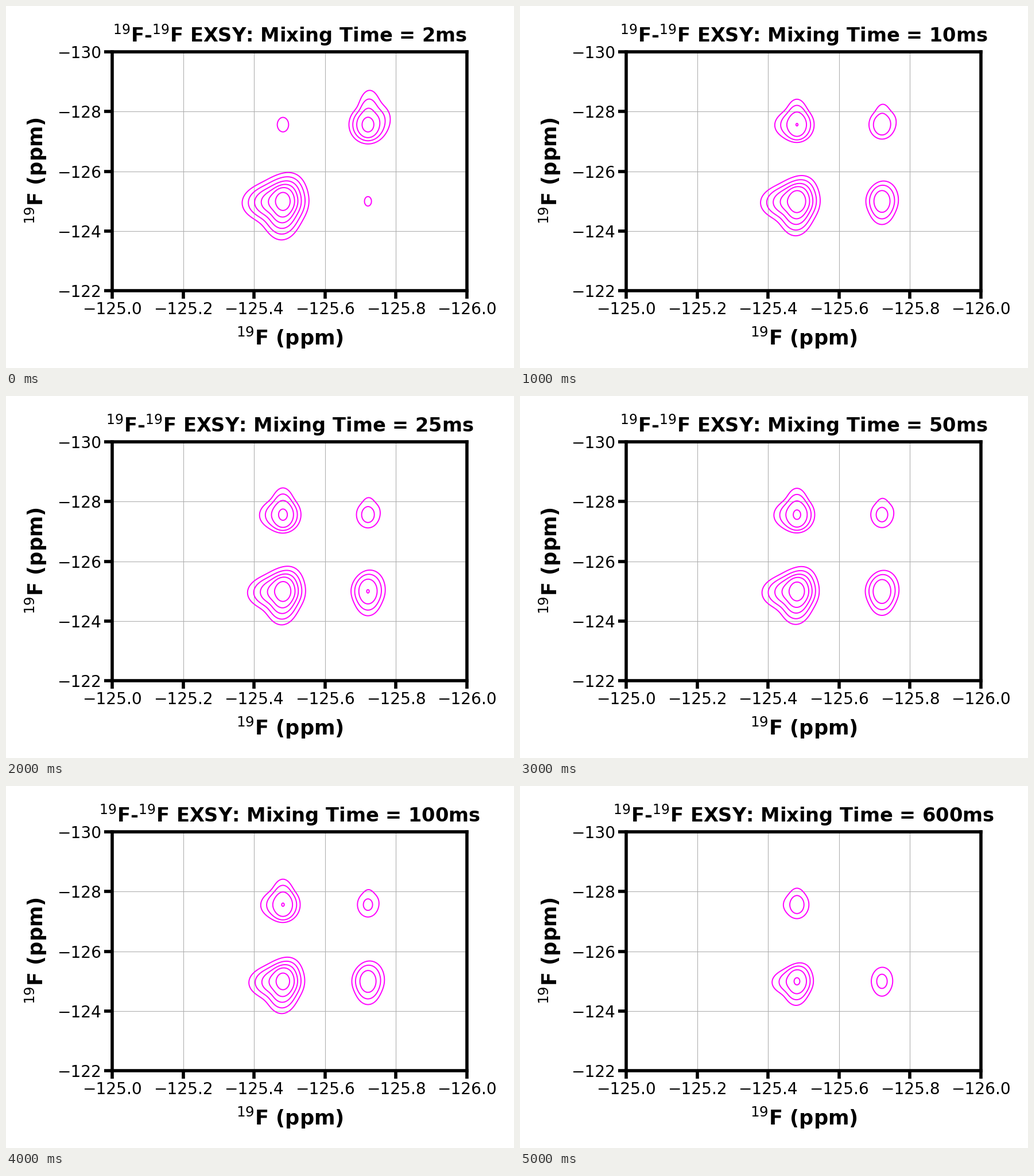
Recreate the animation shown at these times as a matplotlib script. Size 885 by 632 pixels, loop 5.5 s.

```python
import numpy as np
import matplotlib.pyplot as plt
from matplotlib.animation import FuncAnimation
from matplotlib.collections import LineCollection

W, H, DPI = 885, 632, 100
LEFT, RIGHT, TOP, BOTTOM = 185, 803, 80, 497
SCALE = 1.01

MIXING_MS = [2, 5, 10, 15, 25, 35, 50, 75, 100, 200, 600]

EXCHANGE = 0.25    # exchange rate per ms
DECAY = 0.0029     # relaxation, contour levels per ms
PER_E = 3.14       # contour levels per factor e in intensity

THETA = np.linspace(0, 2 * np.pi, 241)


class Peak:
    """A spectral peak whose contours grow from an ellipse to a cornered outline.

    height: contour levels after full exchange; excess: share still to exchange
    core: ellipse half axes; corners: (angle, size, sharpness) added to base
    """

    def __init__(self, x, y, height, excess, core, base, corners):
        self.x, self.y = x, y
        self.height, self.excess = height, excess
        rx, ry = core
        self.core = rx * ry / np.hypot(ry * np.cos(THETA), rx * np.sin(THETA))
        self.outline = base + sum(
            size * np.exp(sharp * (np.cos(THETA - np.radians(angle)) - 1))
            for angle, size, sharp in corners)

    def levels(self, ms):
        mixing = np.log(1 + self.excess * np.exp(-EXCHANGE * ms))
        return self.height + PER_E * mixing - DECAY * ms

    def contour(self, level):
        """Closed curve at a depth of some levels below the summit."""
        m = 1 - np.exp(-(level / 2) ** 2)
        size = np.sqrt(level) * (1 + 0.1 * level)
        r = size * ((1 - m) * self.core + m * self.outline)
        dx = r * np.cos(THETA) / (RIGHT - LEFT)
        dy = r * np.sin(THETA) * 8 / (BOTTOM - TOP)
        return np.column_stack([self.x - dx, self.y - dy])

    def contours(self, ms):
        return [self.contour(v) for v in np.arange(self.levels(ms), 0, -1)]


SITE_A, SITE_B = -125.4814, -125.721
ROW_A, ROW_B = -124.993, -127.56

PEAKS = [
    Peak(SITE_A, ROW_A, 4.85, 0.482, (14.8, 18.6), 12.1,
         [(65, 2, 6), (183, 7, 6), (267, 6, 6)]),
    Peak(SITE_B, ROW_B, 1.56, 1.346, (15, 18.8), 13.2,
         [(88, 9.7, 14), (40, 4, 3)]),
    Peak(SITE_A, ROW_B, 3.31, -1, (15.5, 20), 13,
         [(90, 6.6, 10), (182, 4.3, 5)]),
    Peak(SITE_B, ROW_A, 3.1, -1, (14.7, 20), 12.7,
         [(75, 3.5, 3), (270, 6, 5)]),
]

plt.rcParams["font.family"] = "DejaVu Sans"
fig = plt.figure(figsize=(W / DPI, H / DPI), dpi=DPI, facecolor="white")
ax = fig.add_axes([LEFT / W, 1 - BOTTOM / H, (RIGHT - LEFT) / W, (BOTTOM - TOP) / H])
ax.set_xlim(-125, -126)
ax.set_ylim(-122, -130)
ax.set_xticks(np.linspace(-125, -126, 6))
ax.set_yticks(range(-130, -121, 2))
ax.grid(color="#b0b0b0", linewidth=0.8 * SCALE)
ax.tick_params(labelsize=20 * SCALE, length=10 * SCALE, width=4 * SCALE,
               pad=3.7 * SCALE)
for spine in ax.spines.values():
    spine.set_linewidth(4 * SCALE)
    spine.set_snap(False)


def label(x, y, text, size, **kw):
    return fig.text(x / W, 1 - y / H, text, size=size * SCALE, weight="bold",
                    ha="center", va="baseline", rotation_mode="anchor", **kw)


title = label(494.5, 62, "", 24)
label(494.5, 592, "$^{19}$F (ppm)", 25)
label(65, 288, "$^{19}$F (ppm)", 25, rotation=90)

lines = LineCollection([], colors="#ff00ff", linewidths=1.4, zorder=3)
ax.add_collection(lines, autolim=False)


def draw(i):
    ms = MIXING_MS[i]
    title.set_text(f"$^{{19}}$F-$^{{19}}$F EXSY: Mixing Time = {ms}ms")
    lines.set_segments([c for peak in PEAKS for c in peak.contours(ms)])
    return title, lines


anim = FuncAnimation(fig, draw, frames=len(MIXING_MS), interval=500,
                     repeat=True, repeat_delay=0, blit=False)
plt.show()
```
